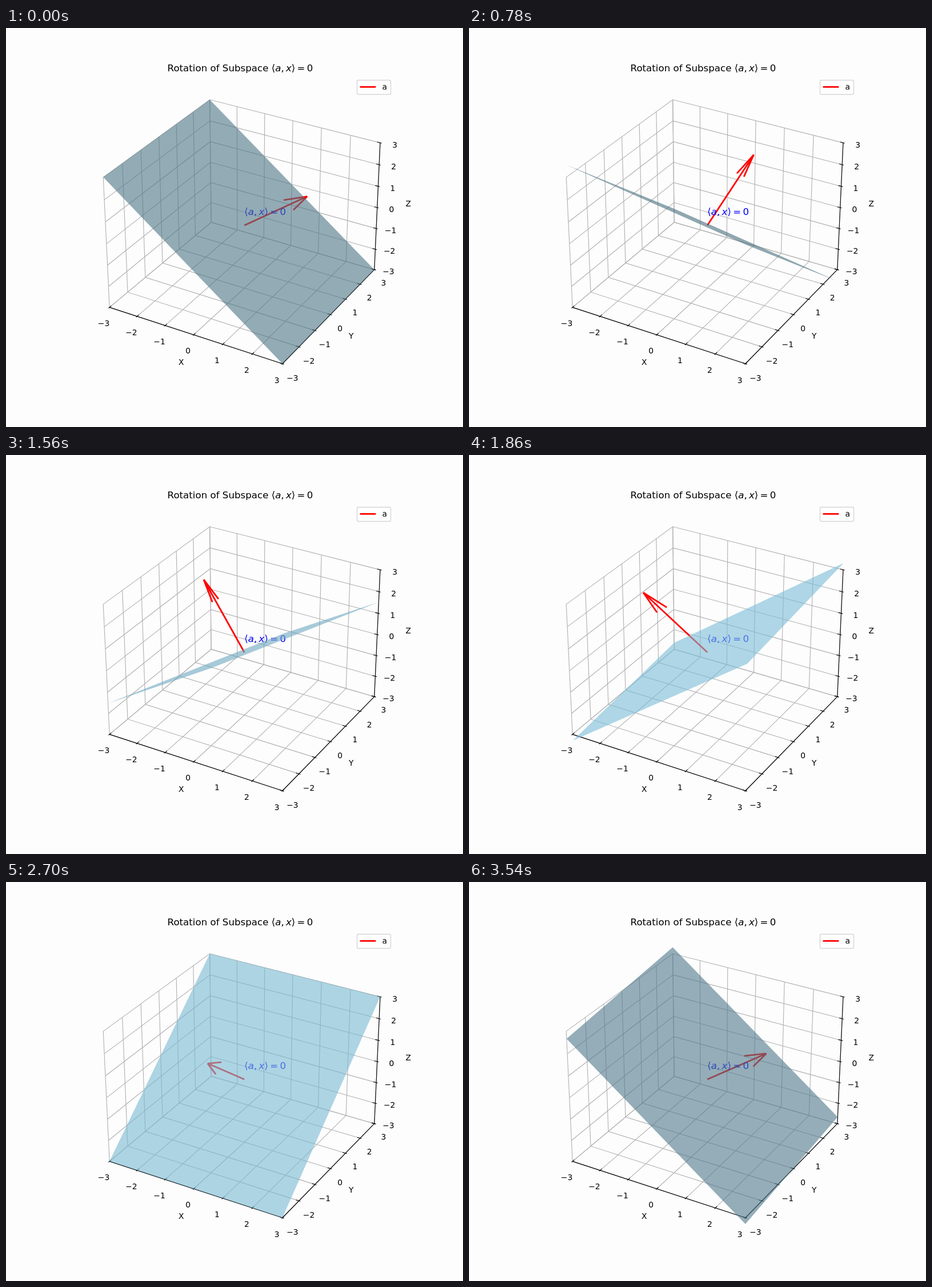
Recreate the animation shown at these times as an HTML page with a canvas. Size 800 px wide and 700 px high, loop 3.6 s.

```html
<!DOCTYPE html>
<html lang="en">
<head>
<meta charset="utf-8">
<title>Rotation of Subspace</title>
<style>
  html, body { margin: 0; width: 100%; height: 100%; overflow: hidden; background: #fdfdfd; }
  canvas { display: block; }
</style>
</head>
<body>
<canvas id="stage" width="800" height="700"></canvas>
<script>
const ctx = document.getElementById('stage').getContext('2d');
const FRAME_MS = 60, FRAMES = 60;
const PT = 100 / 72;                       // pixels per point
const THIN = 0.8 * PT, THICK = 2 * PT;
const FONT = '"DejaVu Sans", sans-serif';
const SMALL = 10 * PT, LARGE = 12 * PT;
const VALUES = [-3, -2, -1, 0, 1, 2, 3];
const RAD = Math.PI / 180;

// Perspective camera at elevation 30, azimuth -60, distance 10.
const UNIT_XY = 1.190476 / 6, UNIT_Z = 0.892857 / 6;
const H = Math.sqrt(3) / 2;
const SCALE = 539 / 0.185;

function project([x, y, z]) {
  x *= UNIT_XY; y *= UNIT_XY; z *= UNIT_Z;
  const depth = 10 - (x * H / 2 - y * 0.75 + z / 2);
  const right = x * H + y / 2;
  const up = -x / 4 + y * H / 2 + z * H;
  return [417.28 + SCALE * right / depth, 346.22 - SCALE * up / depth, depth];
}

const axes = [
  { name: 'X', from: [-3, -3, -3], to: [3, -3, -3],
    tick: (v, o) => [v, -3 - o, -3],
    label: (v, o) => [v, -3 - o, -3 - o],
    grid: v => [[v, -3, -3], [v, 3, -3], [v, 3, 3]] },
  { name: 'Y', from: [3, -3, -3], to: [3, 3, -3],
    tick: (v, o) => [3 + o, v, -3],
    label: (v, o) => [3 + o, v, -3 - o],
    grid: v => [[3, v, -3], [-3, v, -3], [-3, v, 3]] },
  { name: 'Z', from: [3, 3, -3], to: [3, 3, 3],
    tick: (v, o) => [3 + o, 3, v],
    label: (v, o) => [3 + o, 3 + o, v],
    grid: v => [[-3, -3, v], [-3, 3, v], [3, 3, v]] },
];

function trace(points) {
  ctx.beginPath();
  for (const p of points) {
    const [x, y] = project(p);
    ctx.lineTo(x, y);
  }
}

function stroke(points, color, width) {
  trace(points);
  ctx.strokeStyle = color;
  ctx.lineWidth = width;
  ctx.stroke();
}

function write(text, x, y, size, color = '#000', align = 'left', style = '') {
  ctx.font = `${style} ${size}px ${FONT}`;
  ctx.fillStyle = color;
  ctx.textAlign = align;
  ctx.fillText(text, x, y);
}

// Each entry: text, advance in em, style.
const GAP = 0.195;
const FORMULA = [
  ['⟨', 0.39], ['a', 0.613, 'italic'], [',', 0.318 + GAP], ['x', 0.592, 'italic'],
  ['⟩', 0.39 + GAP], ['=', 0.838 + GAP], ['0', 0.636],
];
const FORMULA_WIDTH = LARGE * FORMULA.reduce((sum, part) => sum + part[1], 0);

function writeFormula(x, y, color) {
  for (const [text, advance, style] of FORMULA) {
    write(text, x, y, LARGE, color, 'left', style);
    x += advance * LARGE;
  }
}

function drawAxes() {
  for (const axis of axes)
    for (const v of VALUES) stroke(axis.grid(v), '#b0b0b0', THIN);
  for (const axis of axes) {
    stroke([axis.from, axis.to], '#000', THIN);
    for (const v of VALUES) {
      stroke([axis.tick(v, 0.05), axis.tick(v, -0.1)], '#000', THIN);
      const [x, y] = project(axis.label(v, 0.331));
      write(String(v).replace('-', '−'), x, Math.round(y + 11.5), SMALL, '#000', 'center');
    }
    const [x, y] = project(axis.label(0, 0.719));
    write(axis.name, x, Math.round(y + 5), SMALL, '#000', 'center');
  }
}

function drawTitle() {
  const words = 'Rotation of Subspace ';
  ctx.font = `${LARGE}px ${FONT}`;
  const width = ctx.measureText(words).width;
  const left = 410 - (width + FORMULA_WIDTH) / 2;
  write(words, left, 76, LARGE);
  writeFormula(left + width, 76, '#000');
}

function drawLegend() {
  ctx.beginPath();
  ctx.roundRect(614.5, 91.5, 59, 25, 2.8);
  ctx.fillStyle = 'rgba(255,255,255,0.8)';
  ctx.fill();
  ctx.strokeStyle = 'rgba(204,204,204,0.8)';
  ctx.lineWidth = PT;
  ctx.stroke();
  ctx.fillStyle = '#f00';
  ctx.fillRect(619.6, 102, 27.8, THICK);
  write('a', 658.5, 108, SMALL);
}

function drawScene(angle) {
  const c = Math.cos(angle), s = Math.sin(angle);
  const direction = (elevation, length) => {
    const flat = length * Math.cos(elevation * RAD);
    return [flat * c, flat * s, length * Math.sin(elevation * RAD)];
  };
  const tip = direction(45, 3);
  const barbs = [30, 60].map(e => direction(e, 0.9).map((d, i) => tip[i] - d));
  const corners = [[-3, -3], [3, -3], [3, 3], [-3, 3]].map(([x, y]) => [x, y, -c * x - s * y]);

  const clipped = draw => {
    ctx.save();
    ctx.beginPath();
    ctx.rect(140.5, 84, 539, 539);
    ctx.clip();
    draw();
    ctx.restore();
  };
  const plane = () => clipped(() => {
    const light = (-2 * c - 2 * s + 1) / 3 / Math.SQRT2;
    const shade = 0.65 + 0.35 * light;
    trace(corners);
    ctx.fillStyle = `rgba(${[135, 206, 235].map(k => Math.round(k * shade))},0.6)`;
    ctx.fill();
  });
  const arrow = () => clipped(() => {
    for (const end of [[0, 0, 0], ...barbs]) stroke([end, tip], '#f00', THICK);
  });
  const text = () => writeFormula(417.3, 328, '#00f');

  // Whichever shape reaches closer to the camera is painted last.
  const nearest = points => Math.min(...points.map(p => project(p)[2]));
  const arrowOnTop = nearest([[0, 0, 0], tip, ...barbs]) < nearest(corners);
  const layers = arrowOnTop ? [plane, text, arrow] : [arrow, text, plane];
  layers.forEach(draw => draw());
}

function render() {
  const step = Math.floor(performance.now() / FRAME_MS) % FRAMES;
  ctx.fillStyle = '#fdfdfd';
  ctx.fillRect(0, 0, 800, 700);
  drawAxes();
  drawScene(step * 2 * Math.PI / FRAMES);
  drawTitle();
  drawLegend();
  requestAnimationFrame(render);
}
render();
</script>
</body>
</html>
```
